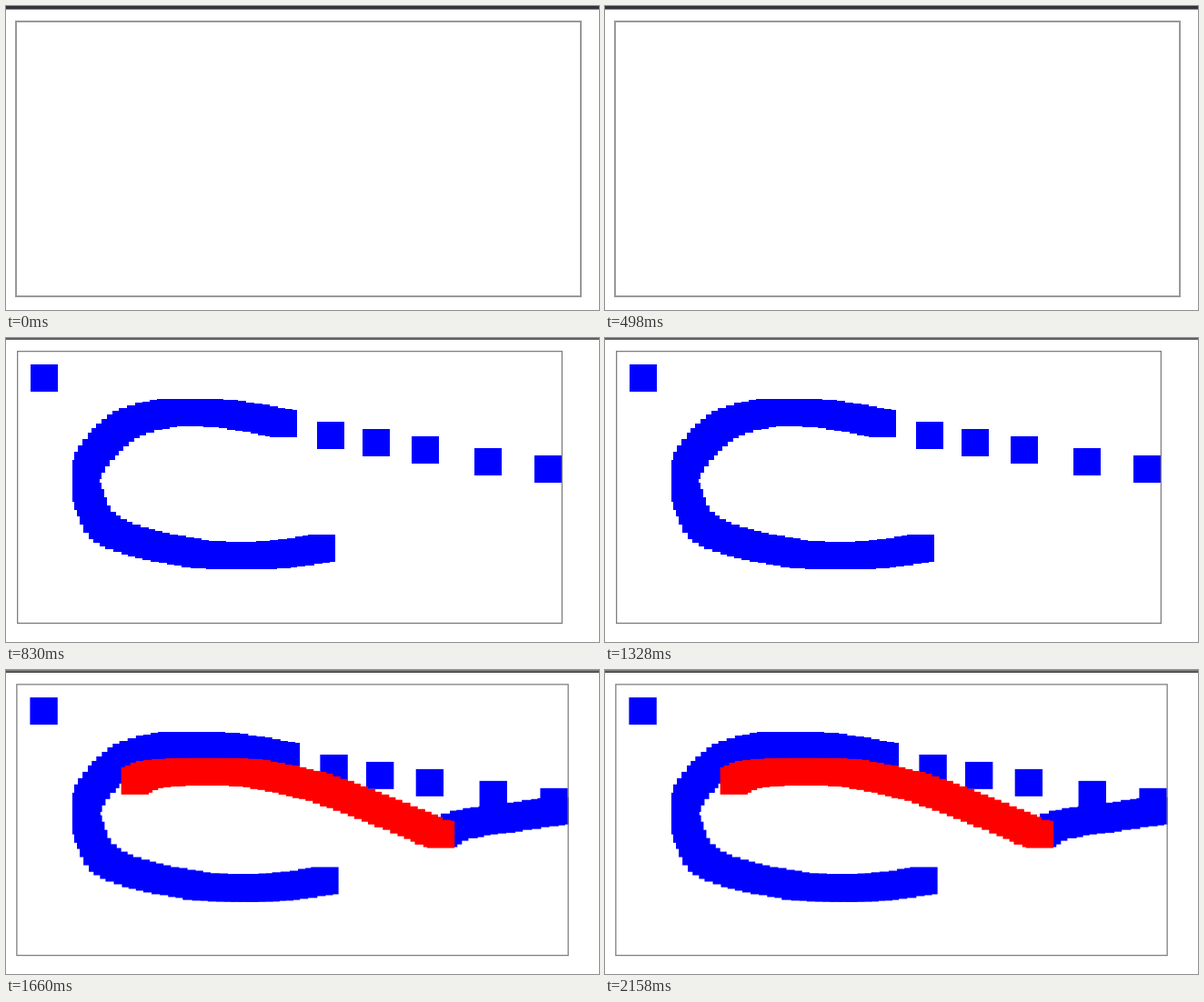
An HTML page with a canvas that plays this animation: 652 px wide and 334 px high, repeating every 2490 ms.

```html
<!DOCTYPE html>
<html>
<head>
<meta charset="utf-8">
<style>
html, body { margin: 0; width: 100%; height: 100%; overflow: hidden; background: #fff; }
canvas { display: block; }
</style>
</head>
<body>
<canvas id="stage" width="652" height="334"></canvas>
<script>
const ctx = document.getElementById('stage').getContext('2d');
const PAPER_W = 600, PAPER_H = 300, BRUSH = 30, STEP = 9, HOLD = 830;
const BLUE = '#00f', RED = '#f00';

// Brush corners on the paper; strokes pass smoothly through their key points.
const dots = [[15, 15], [330, 78], [380, 85.5], [434, 94], [503, 106.5], [569, 115]];
const hook = [[278, 65], [240, 58], [205, 53.5], [176, 53], [146, 54], [105, 66], [78, 90],
  [63, 111], [61, 128], [63, 145], [79, 177], [115, 194], [181, 207.5], [233, 210],
  [278, 208], [320, 202]];
const tail = [[449, 150], [471, 140], [512, 134], [572, 125]];
const wave = [[114, 92], [124, 87], [147, 83], [188, 82], [231, 82.5], [285, 92],
  [330, 104.5], [389, 127.5], [433, 146.5], [446, 151]];

function stamp([x, y], color) {
  ctx.fillStyle = color;
  ctx.fillRect(Math.round(x), Math.round(y), BRUSH, BRUSH);
}

// Catmull-Rom interpolation of one coordinate.
function spline(a, b, c, d, t) {
  return b + t / 2 * (c - a + t * (2 * a - 5 * b + 4 * c - d + t * (3 * (b - c) + d - a)));
}

function stroke(points, color) {
  for (let i = 0; i < points.length - 1; i++) {
    const b = points[i], c = points[i + 1];
    const a = points[i - 1] || b, d = points[i + 2] || c;
    const count = Math.ceil(Math.hypot(c[0] - b[0], c[1] - b[1]) / STEP);
    for (let k = 0; k <= count; k++) {
      stamp([0, 1].map(axis => spline(a[axis], b[axis], c[axis], d[axis], k / count)), color);
    }
  }
}

function drawBlue() {
  dots.forEach(dot => stamp(dot, BLUE));
  stroke(hook, BLUE);
}

const scenes = [
  {
    bar: ['#343238', '#343238', '#3c3a40', '#66646a'],
    box: [10, 16, 633, 320], line: 2, color: '#999',
    draw() {}
  },
  {
    bar: ['#606060', '#606060'],
    box: [12, 14, 612, 314], line: 1.3, color: '#808080',
    draw: drawBlue
  },
  {
    bar: ['#808080', '#606060', '#404040'],
    box: [11.2, 15.2, 618.8, 314.2], line: 1.3, color: '#808080',
    draw() {
      drawBlue();
      stroke(tail, BLUE);
      stroke(wave, RED);
    }
  }
];

function render({ bar, box: [left, top, right, bottom], line, color, draw }) {
  const w = right - left, h = bottom - top;
  ctx.clearRect(0, 0, 652, 334);
  bar.forEach((shade, y) => {
    ctx.fillStyle = shade;
    ctx.fillRect(0, y, 652, 1);
  });

  ctx.save();
  ctx.beginPath();
  ctx.rect(left, top, w, h);
  ctx.clip();
  ctx.translate(left, top);
  ctx.scale(w / PAPER_W, h / PAPER_H);
  draw();
  ctx.restore();

  ctx.strokeStyle = color;
  ctx.lineWidth = line;
  ctx.strokeRect(left + line / 2, top + line / 2, w - line, h - line);
}

const start = performance.now();
function tick() {
  const elapsed = performance.now() - start;
  render(scenes[Math.floor(elapsed / HOLD) % scenes.length]);
  requestAnimationFrame(tick);
}
tick();
</script>
</body>
</html>
```
